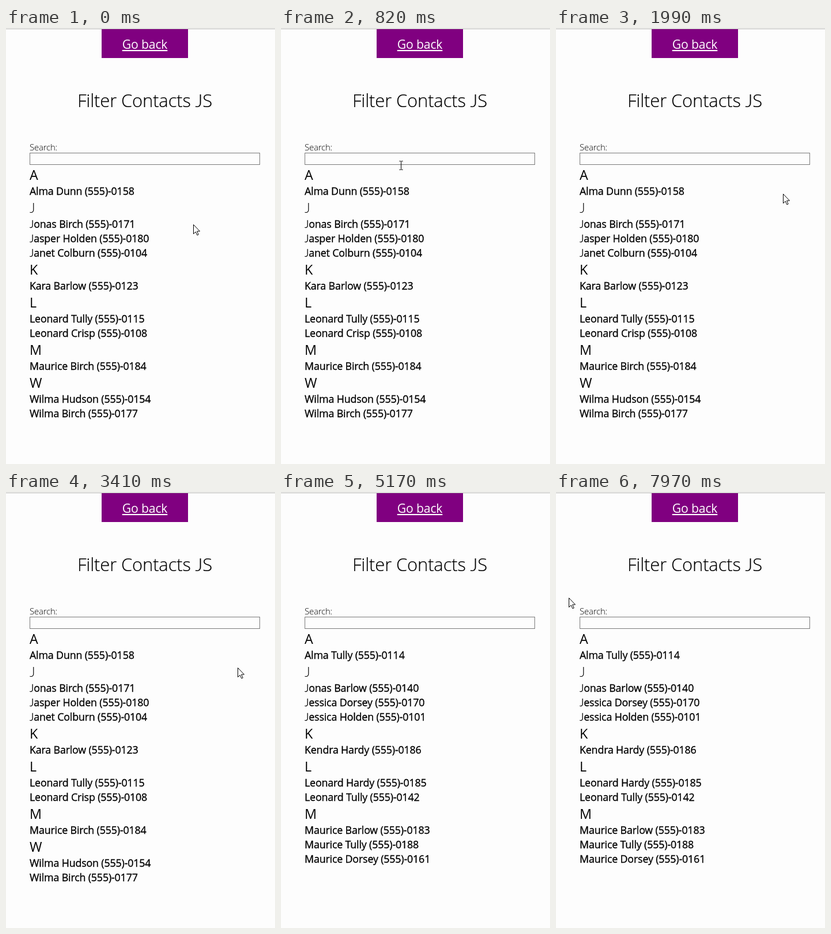
An HTML page for the animation above (7.99 s loop, 467x755 px).

```html
<!DOCTYPE html>
<html lang="en">
<head>
<meta charset="utf-8">
<title>Filter Contacts</title>
<style>
  html, body { margin: 0; width: 100%; height: 100%; overflow: hidden; background: #fdfdfd; }
  svg { display: block; width: 467px; height: 755px; font-family: "Open Sans", "Noto Sans", sans-serif; letter-spacing: -.01em; }
  .j { font-family: Lato, sans-serif; font-weight: 300; }
  .title { font-size: 31px; font-weight: 300; stroke: #000; stroke-width: .2px; }
  .back { font-size: 21.2px; fill: #fff; text-decoration: underline; text-decoration-thickness: 1px; }
  .label { font-size: 14.9px; font-weight: 300; }
  .head { font-size: 23.2px; }
  .item { font-size: 17.8px; letter-spacing: -.008em; stroke: #000; stroke-width: .35px; }
</style>
</head>
<body>
<svg viewBox="0 0 467 755">
  <rect width="467" height="755" fill="#fdfdfd"/>
  <rect y="1" width="467" height="1" fill="#b4b4b0"/>
  <rect x="166" y="2" width="150" height="50" fill="purple"/>
  <text class="back" x="241" y="36" text-anchor="middle">Go back</text>
  <text class="title" x="241" y="137" text-anchor="middle">Filter Contacts <tspan class="j">J</tspan>S</text>
  <text class="label" x="41" y="212">Search:</text>
  <rect id="field" x="41.5" y="216.5" width="399" height="20" fill="#fdfdfd"/>
  <g id="before"></g>
  <g id="after"></g>
  <path id="arrow" d="M.5 .5V16.5L4.2 13 6.9 18.8 9.2 17.8 6.6 12H11.5Z" fill="#fff" stroke="#000"/>
  <path id="beam" d="M-3 -7.5H-1L0 -7 1 -7.5H3M0 -7V7M-3 7.5H-1L0 7 1 7.5H3" fill="none" stroke="#000"/>
</svg>
<script>
const LOOP = 7990, RELOAD = 5170;
const $ = id => document.getElementById(id);

// Contacts as "name, last two digits of the number", sorted by name
const lists = {
  before: ["Alma Dunn 58", "Jonas Birch 71", "Jasper Holden 80", "Janet Colburn 04", "Kara Barlow 23",
    "Leonard Tully 15", "Leonard Crisp 08", "Maurice Birch 84", "Wilma Hudson 54", "Wilma Birch 77"],
  after: ["Alma Tully 14", "Jonas Barlow 40", "Jessica Dorsey 70", "Jessica Holden 01", "Kendra Hardy 86",
    "Leonard Hardy 85", "Leonard Tully 42", "Maurice Barlow 83", "Maurice Tully 88", "Maurice Dorsey 61"]
};

function line(kind, y, text) {
  const body = text.replace(/J/g, '<tspan class="j">J</tspan>');
  return `<text class="${kind}" x="41" y="${y}">${body}</text>`;
}

function render(contacts) {
  let top = 239, initial = "", out = "";
  for (const contact of contacts) {
    if (contact[0] !== initial) {
      initial = contact[0];
      out += line("head", top + 24, initial);
      top += 32;
    }
    out += line("item", top + 18, contact.replace(/ (\d+)$/, " (555)-01$1"));
    top += 25;
  }
  return out;
}

for (const id in lists) $(id).innerHTML = render(lists[id]);

// Pointer path: time, x, y, shape until the next key
const path = [
  [0, 325, 340, "arrow"], [20, 325, 340, "arrow"], [540, 226, 272, "arrow"], [720, 208, 238, "arrow"],
  [820, 208, 238, "beam"], [860, 203, 226, "beam"], [1010, 203, 226, "beam"],
  [1010, 269, 314, "arrow"], [1040, 269, 304, "arrow"], [1300, 269, 304, "beam"],
  [1440, 274, 255, "beam"], [1540, 274, 255, "beam"], [1840, 54, 254, "beam"], [1990, 54, 254, "beam"],
  [1990, 394, 287, "arrow"], [3410, 394, 287, "arrow"], [3410, 402, 304, "arrow"], [3430, 402, 304, "arrow"],
  [3700, 410, 237, "beam"], [3830, 416, 214, "arrow"], [4030, 428, 176, ""],
  [7710, -8, 176, "arrow"], [7970, 22, 183, "arrow"], [LOOP, 22, 183, "arrow"]
];

const within = (t, a, b) => t >= a && t < b;
const show = (id, on) => $(id).setAttribute("visibility", on ? "visible" : "hidden");

function draw(t) {
  const next = path.findIndex(key => key[0] > t);
  const [t0, x0, y0, shape] = path[next - 1], [t1, x1, y1] = path[next];
  const k = (t - t0) / (t1 - t0);
  const x = Math.round(x0 + (x1 - x0) * k), y = Math.round(y0 + (y1 - y0) * k);
  for (const id of ["arrow", "beam"]) {
    show(id, id === shape);
    $(id).setAttribute("transform", `translate(${id === "beam" ? x + .5 : x} ${y})`);
  }
  const hover = within(t, 840, 1560) || within(t, 3700, 3830);
  $("field").setAttribute("stroke", hover ? "#181818" : "#7a7a7a");
  show("before", t < RELOAD);
  show("after", t >= RELOAD);
}

const start = performance.now();
function tick() {
  draw((performance.now() - start) % LOOP);
  requestAnimationFrame(tick);
}
tick();
</script>
</body>
</html>
```
